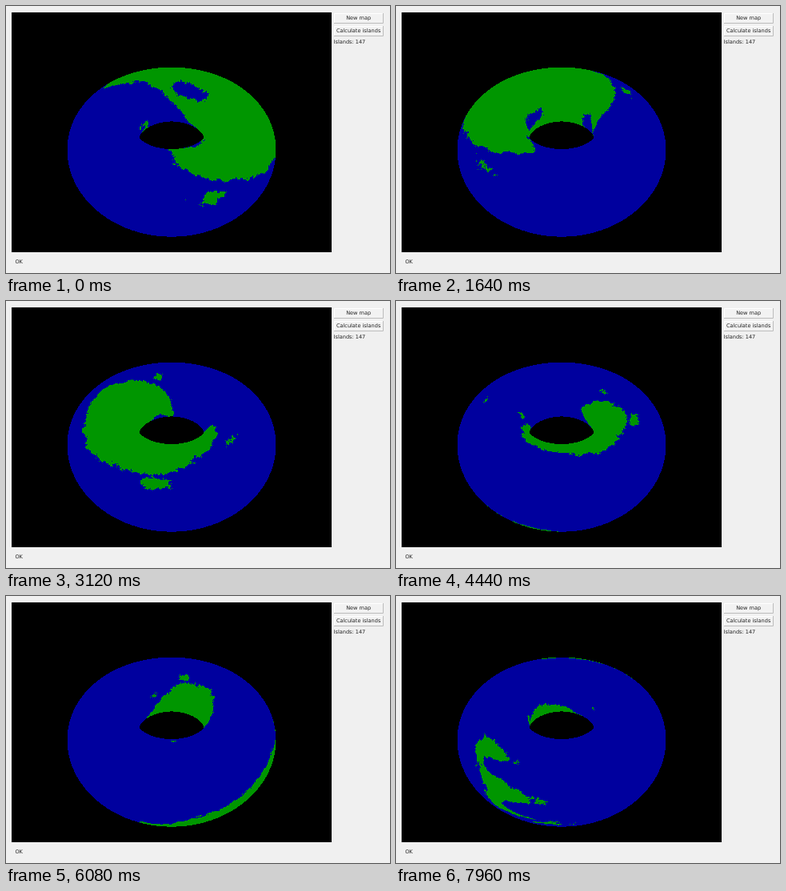
Animation, 480 px wide and 334 px high, one loop 8000 ms. Source, as an HTML page with a canvas:

```html
<!DOCTYPE html>
<html lang="en">
<head>
<meta charset="utf-8">
<title>Torus islands</title>
<style>
  html, body { margin: 0; width: 100%; height: 100%; overflow: hidden; background: #f0f0f0; }
  svg, canvas { position: absolute; left: 0; top: 0; display: block; }
  canvas { left: 7px; top: 8px; background: #000; }
  text { font: 6.55px "DejaVu Sans", sans-serif; fill: #222; }
  .mid { text-anchor: middle; }
</style>
</head>
<body>
<svg width="480" height="334" viewBox="0 0 480 334">
  <g id="buttons"></g>
  <text x="409.6" y="47.2">Islands: 147</text>
  <text x="11.4" y="322.4">OK</text>
</svg>
<canvas id="view" width="400" height="300"></canvas>
<script>
const LOOP = 8000, STEP = 40;
const SPIN = 1, ROLL = 0.4;            // rad per second around the axis and the tube
const W = 1024, H = 512, TAU = Math.PI * 2;
const FOCAL = 259.8, DIST = 6.46, K = Math.SQRT1_2;

function hash(x, y, seed) {
  let n = Math.imul(x, 374761393) ^ Math.imul(y, 668265263) ^ Math.imul(seed, 974634777);
  n = Math.imul(n ^ (n >>> 13), 1274126177);
  return ((n ^ (n >>> 16)) >>> 0) / 4294967296;
}

// Value noise that wraps at the map edges
function noise(x, y, cell) {
  const nx = W / cell, ny = H / cell;
  const x0 = Math.floor(x / cell), y0 = Math.floor(y / cell);
  const fx = x / cell - x0, fy = y / cell - y0;
  const x1 = (x0 + 1) % nx, y1 = (y0 + 1) % ny;
  const a = hash(x0, y0, cell), b = hash(x1, y0, cell);
  const c = hash(x0, y1, cell), d = hash(x1, y1, cell);
  return (a + (b - a) * fx) * (1 - fy) + (c + (d - c) * fx) * fy - 0.5;
}

function roughness(x, y) {
  let sum = 0, amp = 8;
  for (let cell = 32; cell >= 2; cell /= 2, amp *= 0.82) sum += amp * noise(x, y, cell);
  return sum;
}

// Positive inside an ellipse
const blob = (u, v, cu, cv, ru, rv) =>
  (1 - Math.hypot((u - cu) / ru, (v - cv) / rv)) * Math.min(ru, rv);

// Continent between two parabolas and a slanted coast, with a lake and a bay
function continent(u, v) {
  return Math.min(
    v + 8 - 0.0061 * (u - 42) ** 2,
    251 - 0.006 * (u + 10) ** 2 - v,
    (261 - 1.2 * u - v) * 0.7,
    u + 90,
    -blob(u, v, 67, 132, 27, 15),
    -blob(u, v, -66, 156, 18, 28)
  );
}

// Narrow land whose far coast swings in and out
function ridge(u, v) {
  const side = u - 121 - (252 - v) * 0.356;
  const width = 16 + 13 * Math.cos((v - 251) * TAU / 38);
  return Math.min(side, width - side, v - 182, 254 - v);
}

const ISLETS = [[134, 18], [-72, 46], [81, -10], [-77, -19], [170, 178]];

function height(u, v) {
  const islets = ISLETS.map(([cu, cv]) => blob(u, v, cu, cv, 4, 3));
  return Math.max(continent(u, v), ridge(u, v), ...islets);
}

function makeMap() {
  const map = new Uint8Array(W * H);
  for (let y = 0; y < H; y++) for (let x = 0; x < W; x++) {
    const u = (x / W * 360 + 144) % 360 - 144;
    const v = (y / H * 360 + 50) % 360 - 50;
    const h = height(u, v);
    map[y * W + x] = h > -16 && h + roughness(x, y) > 0 ? 1 : 0;
  }
  return map;
}

// Where the ray through a pixel meets the torus (radii 2 and 1), as map coordinates
function trace(px, py) {
  let dx = px / FOCAL, up = -py / FOCAL;
  const len = Math.hypot(dx, up, 1);
  dx /= len;
  const dy = (up + 1 / 1) * 0 + (-py / FOCAL + 1) * K / len;
  const dz = (-py / FOCAL - 1) * K / len;
  for (let i = 0, s = 2; i < 90 && s < 12; i++) {
    const x = dx * s, y = -DIST * K + dy * s, z = DIST * K + dz * s;
    const ring = Math.hypot(x, y) - 2;
    const gap = Math.hypot(ring, z) - 1;
    if (gap < 0.003) {
      const u = Math.atan2(y, x) / TAU, v = Math.atan2(z, ring) / TAU;
      return [(u + 1) * W, (v + 1) * H];
    }
    s += gap;
  }
  return null;
}

const view = document.getElementById('view');
const ctx = view.getContext('2d');
const image = ctx.createImageData(view.width, view.height);
const pixels = new Uint32Array(image.data.buffer).fill(0xff000000);
const COLORS = [0xff9e0000, 0xff009600];   // sea, land as ABGR
const map = makeMap();

const hits = [];
for (let y = 0; y < view.height; y++) for (let x = 0; x < view.width; x++) {
  const hit = trace(x + 0.5 - view.width / 2, y + 0.5 - view.height / 2);
  if (hit) hits.push({ at: y * view.width + x, u: hit[0], v: hit[1] });
}

function draw(ms) {
  const t = Math.floor((ms % LOOP) / STEP) * STEP / 1000;
  const du = SPIN * t / TAU * W, dv = ROLL * t / TAU * H;
  for (const p of hits) {
    const x = Math.floor(p.u - du) & (W - 1), y = Math.floor(p.v - dv) & (H - 1);
    pixels[p.at] = COLORS[map[y * W + x]];
  }
  ctx.putImageData(image, 0, 0);
}

function button(y, label) {
  return `<rect x="410" y="${y}" width="62" height="13" fill="#f2f2f2"/>
    <path d="M410.5 ${y + 12}V${y + 0.5}H471" fill="none" stroke="#fff"/>
    <path d="M410 ${y + 12.5}H471.5V${y}" fill="none" stroke="#bcbcbc"/>
    <text class="mid" x="440.6" y="${y + 8.4}">${label}</text>`;
}
document.getElementById('buttons').innerHTML = button(9, 'New map') + button(25, 'Calculate islands');

const start = performance.now();
function tick() {
  draw(performance.now() - start);
  requestAnimationFrame(tick);
}
tick();
</script>
</body>
</html>
```
